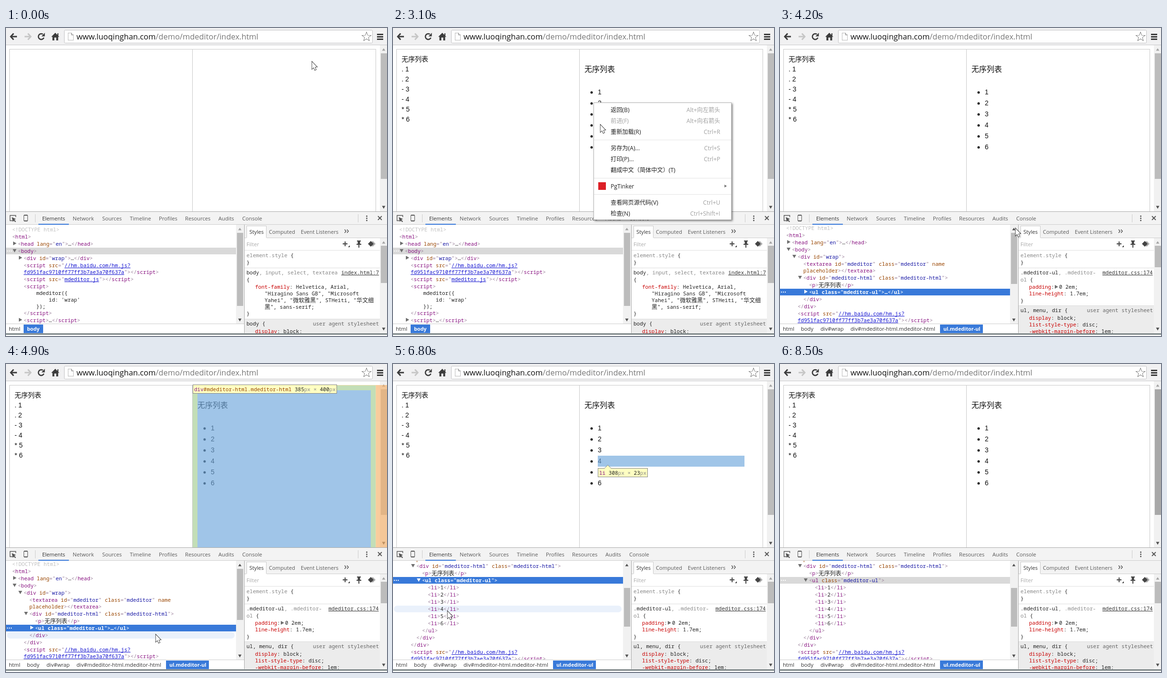
Write an HTML page with a canvas that moves like this. It is 800 px wide and 645 px high and loops after 8600 ms.

```html
<!DOCTYPE html>
<html lang="zh">
<head>
<meta charset="utf-8">
<style>
html, body { margin: 0; width: 100%; height: 100%; overflow: hidden; background: #fff; }
canvas { display: block; }
</style>
</head>
<body>
<canvas id="stage" width="800" height="645"></canvas>
<script>
const c = document.getElementById('stage').getContext('2d');
const LOOP = 8600, STEP = 100;
const MONO = '11px "Noto Sans Mono", monospace';
const CJK = '"Noto Sans CJK SC", "Noto Sans CJK", sans-serif';
const UI = '11.2px "Open Sans", sans-serif';
const MENU = '12.2px "Open Sans", ' + CJK;
const PAGE = 'px "Liberation Sans", ' + CJK;
const BLUE = '#3879d9';
const INK = { p: '#9a809a', t: '#881280', a: '#994500', v: '#1a1aa6', l: '#1414d0', k: '#222',
  z: '#222', d: '#c0c0c0', s: '#888', r: '#c80000', u: '#333' };

// ---------- basic drawing ----------
function rect(x, y, w, h, color) { c.fillStyle = color; c.fillRect(x, y, w, h); }
function frame(x, y, w, h, color) {
  c.strokeStyle = color; c.lineWidth = 1; c.strokeRect(x + .5, y + .5, w - 1, h - 1);
}
function pill(x, y, w, h, r, fill, line) {
  c.beginPath(); c.roundRect(x, y, w, h, r);
  if (fill) { c.fillStyle = fill; c.fill(); }
  if (line) { c.strokeStyle = line; c.lineWidth = 1; c.stroke(); }
}
function poly(pts, fill, line, width = 1, open) {
  c.beginPath();
  for (let i = 0; i < pts.length; i += 2) c.lineTo(pts[i], pts[i + 1]);
  if (!open) c.closePath();
  if (line) { c.strokeStyle = line; c.lineWidth = width; c.stroke(); }
  if (fill) { c.fillStyle = fill; c.fill(); }
}
function dot(x, y, r, color) { c.beginPath(); c.arc(x, y, r, 0, 7); c.fillStyle = color; c.fill(); }
function text(s, x, y, color, font, align = 'left') {
  c.font = font; c.fillStyle = color; c.textAlign = align; c.fillText(s, x, y);
  return c.measureText(s).width;
}
function clip(x, y, w, h, draw) {
  c.save(); c.beginPath(); c.rect(x, y, w, h); c.clip(); draw(); c.restore();
}
// Coloured code: each "|" is followed by an ink key.
function code(s, x, y, picked) {
  for (const part of s.split('|').slice(1)) {
    const key = part[0], str = part.slice(1);
    const color = !picked ? INK[key] : key === 'p' ? '#d3e2f8' : '#fff';
    const wide = key === 'z';
    const font = wide ? '12px ' + CJK : picked ? 'bold ' + MONO : MONO;
    const w = text(str, x, y + (wide ? 5 : 4), color, font);
    if (key === 'l' || key === 'u') rect(x, y + 5, w, 1, color);
    x += w;
  }
}
function tri(x, y, dir, color, r = 4) {
  if (dir === 'right') poly([x - r + 1, y - r, x + r, y, x - r + 1, y + r], color);
  if (dir === 'down') poly([x - r, y - r + 1, x + r, y - r + 1, x, y + r], color);
  if (dir === 'up') poly([x - r, y + r - 1, x + r, y + r - 1, x, y - r + 1], color);
}
function scrollbar(x, top, bottom, from, to, color, topInk = '#a3a3a3') {
  rect(x, top, 15, bottom - top, '#f1f1f1');
  rect(x + 2, from, 13, to - from, color);
  tri(x + 8, top + 9, 'up', topInk, 3.5);
  tri(x + 8, bottom - 9, 'down', '#505050', 3.5);
}

// ---------- browser bar ----------
function browserBar() {
  rect(0, 0, 800, 36, '#f1f1f2');
  rect(0, 35, 800, 1, '#c6c6c8');
  pill(122.5, 4.5, 647, 27, 2, '#fff', '#c2c2c4');
  const arrow = (x, d, color) => {
    poly([x + 7 * d, 18, x - 5 * d, 18], null, color, 3, true);
    poly([x, 11.5, x - 6 * d, 18, x, 24.5], null, color, 3, true);
  };
  arrow(16, 1, '#3c3c3c');
  arrow(46, -1, '#c6c6c6');
  c.beginPath(); c.arc(74, 18, 6, .4, 5.3);
  c.strokeStyle = '#3c3c3c'; c.lineWidth = 2.6; c.stroke();
  poly([81.5, 10, 81.5, 17.5, 74.5, 17.5], '#3c3c3c');
  poly([95, 18.5, 103.5, 10, 112, 18.5, 109.5, 18.5, 109.5, 26, 105.5, 26, 105.5, 20,
    101.5, 20, 101.5, 26, 97.5, 26, 97.5, 18.5], '#3c3c3c');
  rect(108, 11, 2, 5, '#3c3c3c');
  poly([130.5, 10.5, 137.5, 10.5, 141.5, 14.5, 141.5, 25.5, 130.5, 25.5], '#fff', '#777');
  poly([137.5, 10.5, 137.5, 14.5, 141.5, 14.5], null, '#777', 1, true);
  const font = '16.45px "Open Sans", sans-serif';
  const w = text('www.luoqinghan.com', 148, 24, '#111', font);
  text('/demo/mdeditor/index.html', 148 + w, 24, '#777', font);
  const star = [];
  for (let i = 0; i < 10; i++) {
    const a = i * Math.PI / 5 - Math.PI / 2, r = i % 2 ? 3.8 : 9;
    star.push(757 + r * Math.cos(a), 18.5 + r * Math.sin(a));
  }
  poly(star, '#fff', '#666', 1.6);
  for (const y of [12, 17, 22]) rect(779, y, 13, 3, '#3c3c3c');
}

// ---------- web page ----------
function page(t) {
  rect(0, 36, 800, 348, '#fff');
  frame(7, 44, 770, 400, '#c9c9c9');
  rect(391, 44, 1, 340, '#c9c9c9');
  const focus = t >= 400 && t < 2800;
  if (focus) {
    c.save();
    c.shadowColor = 'rgba(82,168,236,.8)'; c.shadowBlur = 8;
    rect(7, 44, 385, 400, '#66afe9');
    c.restore();
    rect(8, 45, 383, 398, '#fff');
    if (t < 1300) rect(18, 58, 1, 15, '#000');
    else if (t < 1700) rect(18, 204, 1, 15, '#000');
  }
  if (t >= 1300) {
    text('无序列表', 18, 70, '#111', 14 + PAGE);
    text('无序列表', 402, 92, '#111', 16 + PAGE);
    for (let i = 0; i < 6; i++) {
      text('..--**'[i] + ' ' + (i + 1), 18, 91 + 21 * i, '#111', 14 + PAGE);
      text(i + 1, 430, 139 + 23 * i, '#111', 14 + PAGE);
      dot(417, 135 + 23 * i, 2.5, '#111');
    }
  }
  scrollbar(785, 36, 384, 53, 316, t >= 7800 ? '#a8a8a8' : '#bcbcbc');
}

const FILL = 'rgba(111,168,220,.66)', PAD = 'rgba(147,196,125,.55)';
const MARGIN = 'rgba(246,178,107,.66)', BORDER = 'rgba(255,229,153,.66)';
function tip(x, y, name, w, h, notch) {
  const s = name + `|k ${w}|spx × |k${h}|spx`;
  c.font = MONO;
  const width = Math.ceil(c.measureText(s.replace(/\|./g, '')).width) + 6;
  rect(x, y, width, 19, '#ffffc2');
  frame(x, y, width, 19, '#858585');
  if (notch) {
    poly([x + 14, y + 1, x + 21, y - 6, x + 28, y + 1], '#ffffc2');
    poly([x + 14, y + .5, x + 21, y - 6.5, x + 28, y + .5], null, '#858585', 1, true);
  }
  code(s, x + 3, y + 10);
}
function overlay(node) {
  if (node === 'box') {
    rect(402, 55, 364, 329, FILL);
    rect(392, 45, 384, 10, PAD);
    rect(392, 55, 10, 329, PAD);
    rect(766, 55, 10, 329, PAD);
    rect(392, 44, 385, 1, BORDER);
    rect(776, 45, 1, 339, BORDER);
    rect(777, 44, 23, 340, MARGIN);
    tip(392, 43, '|tdiv|a#mdeditor-html.mdeditor-html', 385, 400);
  } else if (node === 'p') {
    rect(402, 75, 364, 24, FILL);
    tip(402, 102, '|tp', 364, 24, true);
  } else if (node === 'ul') {
    rect(430, 123, 308, 138, FILL);
    rect(402, 123, 28, 138, PAD);
    rect(738, 123, 28, 138, PAD);
    rect(402, 109, 364, 14, MARGIN);
    rect(402, 261, 364, 14, MARGIN);
    tip(402, 278, '|tul|a.mdeditor-ul', 364, 138, true);
  } else if (node > 0) {
    const y = 100 + 23 * node;
    rect(430, y, 308, 23, FILL);
    tip(430, y + 26, '|tli', 308, 23, true);
  }
}

// ---------- element tree ----------
const start = (name, ...attrs) => `|p<|t${name}` + attrs.map(([k, v]) => `|p |a${k}|p="|v${v}|p"`).join('');
const open = (...a) => start(...a) + '|p>';
const close = name => `|p</|t${name}|p>`;
const R = 'right', D = 'down';
const hashRows = [
  [37, '', '|p<|tscript |asrc|p="|l//hm.baidu.com/hm.js?', 14],
  [37, '', '|lfd951fac9710ff77ff3b7ae3a70f637a|p">' + close('script'), 15]
];
const headRows = [
  [13, '', '|d<!DOCTYPE html>', 15],
  [13, '', open('html'), 15],
  [25, R, open('head', ['lang', 'en']) + '|k…' + close('head'), 15],
  [25, D, open('body'), 15, 'body']
];
const shortTree = [
  ...headRows,
  [37, R, open('div', ['id', 'wrap']) + '|k…' + close('div'), 15],
  ...hashRows,
  [37, '', '|p<|tscript |asrc|p="|lmdeditor.js|p">' + close('script'), 15],
  [37, '', open('script'), 14],
  [37, '', '|k    mdeditor({', 14],
  [37, '', "|k        id: 'wrap'", 14],
  [37, '', '|k    });', 14],
  [37, '', close('script'), 15],
  [37, R, open('script') + '|k…' + close('script'), 15]
];
function fullTree(opened) {
  const ul = open('ul', ['class', 'mdeditor-ul']);
  const list = [1, 2, 3, 4, 5, 6].map(n => [73, '', open('li') + '|k' + n + close('li'), 15, n]);
  return [
    ...headRows,
    [37, D, open('div', ['id', 'wrap']), 15],
    [49, '', start('textarea', ['id', 'mdeditor'], ['class', 'mdeditor']) + '|a name', 14],
    [49, '', '|aplaceholder|p>' + close('textarea'), 15],
    [49, D, open('div', ['id', 'mdeditor-html'], ['class', 'mdeditor-html']), 15, 'box'],
    [61, '', open('p') + '|z无序列表' + close('p'), 15, 'p'],
    ...(opened ? [[61, D, ul, 15, 'ul'], ...list, [61, '', close('ul'), 15, 'ul']]
      : [[61, R, ul + '|k…' + close('ul'), 15, 'ul']]),
    [49, '', close('div'), 15, 'box'],
    [37, '', close('div'), 15],
    ...hashRows
  ];
}
const closedTree = fullTree(false), openTree = fullTree(true);

// Draws the tree and returns the node under the pointer.
function tree(t, px, py) {
  const rows = t < 4000 ? shortTree : t < 5600 ? closedTree : openTree;
  const pick = t < 4000 ? 'body' : 'ul', blue = t >= 4000 && t < 8500;
  const inside = px >= 0 && px < 483 && py > 412 && py < 619;
  let y = t < 4000 ? 422 : t < 5600 ? 419 : 319, hit, picked;
  rect(0, 412, 484, 208, '#fff');
  clip(0, 412, 484, 208, () => {
    for (const [x, arrow, s, step, node] of rows) {
      const chosen = node === pick && !picked;
      const over = inside && py >= y - 7.5 && py < y + 7.5;
      if (over) hit = node;
      if (chosen) {
        picked = true;
        rect(0, y - 7, 483, 14, blue ? BLUE : '#d9d9d9');
        for (const dx of [2, 6, 10]) rect(dx, y - 1, 2, 2, '#fff');
      } else if (over) pill(2, y - 7, 478, 14, 7, '#eaf1fb');
      if (arrow) tri(x - 7, y - 1, arrow, chosen && blue ? '#fff' : '#6e6e6e');
      code(s, x, y, chosen && blue);
      y += step;
    }
  });
  const [from, to] = t < 4000 ? [429, 582] : t < 5600 ? [429, 536] : [469, 550];
  scrollbar(483, 412, 620, from, to, '#bcbcbc', t < 4000 ? '#a3a3a3' : '#505050');
  return hit;
}

// ---------- developer panel ----------
function panelBar() {
  rect(0, 384, 800, 261, '#f3f3f3');
  rect(0, 384, 800, 1, '#a9a9a9');
  rect(0, 411, 800, 1, '#cdcdcd');
  const ink = '#555';
  poly([17, 403.5, 8.5, 403.5, 8.5, 392.5, 20.5, 392.5, 20.5, 396], null, ink, 1.4, true);
  poly([12, 396, 21, 400, 17.5, 401.5, 21, 405, 19.5, 406.5, 16, 403, 14.5, 406], ink);
  pill(37.5, 391.5, 8, 13, 1.5, null, ink);
  rect(38, 391, 7, 2, ink); rect(38, 403, 7, 2, ink);
  rect(61, 390, 1, 17, '#ccc');
  rect(739, 390, 1, 17, '#ccc');
  const tabs = { Elements: 76, Network: 140, Sources: 202, Timeline: 260, Profiles: 321,
    Resources: 376, Audits: 446, Console: 496 };
  for (const name in tabs) text(name, tabs[name], 403, name === 'Elements' ? '#333' : '#5a5a5a', UI);
  rect(68, 410, 64, 2, BLUE);
  for (const y of [394, 398.5, 403]) dot(757.5, y, 1.5, ink);
  poly([781, 394, 789, 402], null, ink, 1.8, true);
  poly([789, 394, 781, 402], null, ink, 1.8, true);
}

function crumbs(t) {
  rect(0, 619, 500, 21, '#fff');
  rect(0, 619, 500, 1, '#cdcdcd');
  const items = t < 4000 ? [['html', 6], ['body', 44, 37, 41]]
    : [['html', 6], ['body', 44], ['div#wrap', 85], ['div#mdeditor-html.mdeditor-html', 148],
      ['ul.mdeditor-ul', 343, 336, 90]];
  for (const [s, x, left, w] of items) {
    if (w) rect(left, 621, w, 18, BLUE);
    text(s, x, 634, w ? '#fff' : '#333', w ? 'bold 10.8px "Open Sans", sans-serif' : UI);
  }
}

const bodyRules = [
  [505, 512, '|kbody|s, input, select, textarea'], [704, 512, '|uindex.html:7'], [505, 527, '|k{'],
  [523, 542, '|rfont-family|k: Helvetica, Arial,'],
  [543, 556, '|k"Hiragino Sans GB", "Microsoft'],
  [543, 570, '|kYahei", "|z微软雅黑|k", STHeiti, "|z华文细'],
  [543, 584, '|z黑|k", sans-serif;'], [505, 598, '|k}'],
  [505, 619, '|kbody {'], [523, 635, '|rdisplay|k: block;']
];
const listRules = [
  [505, 512, '|k.mdeditor-ul|s, .mdeditor-'], [677, 512, '|umdeditor.css:174'], [505, 527, '|sol |k{'],
  [523, 542, '|rpadding|k:'], [586, 542, '|k0 2em;'], [523, 556, '|rline-height|k: 1.7em;'],
  [505, 571, '|k}'], [505, 591, '|kul, menu, dir {'], [523, 607, '|rdisplay|k: block;'],
  [523, 621, '|rlist-style-type|k: disc;'], [523, 635, '|r-webkit-margin-before|k: 1em;']
];
function sidebar(t) {
  const first = t < 4000, agent = first ? 609 : 581;
  rect(500, 412, 1, 228, '#a9a9a9');
  rect(501, 439, 299, 1, '#cdcdcd');
  rect(505, 414, 42, 26, '#fff');
  poly([505.5, 439, 505.5, 414.5, 546.5, 414.5, 546.5, 439], null, '#c9c9c9', 1, true);
  text('Styles', 511, 431, '#333', UI);
  text('Computed', 552, 431, '#5a5a5a', UI);
  text('Event Listeners', 619, 431, '#5a5a5a', UI);
  for (const x of [711, 716]) poly([x, 422, x + 3, 425.5, x, 429], null, '#555', 1.5, true);
  rect(501, 440, 285, 200, '#fff');
  rect(501, 465, 285, 1, '#e0e0e0');
  text('Filter', 505, 457, '#aaa', UI);
  rect(707, 451, 10, 2, '#444'); rect(711, 447, 2, 10, '#444');
  poly([722, 455, 722, 459, 718, 459], '#444');
  rect(737, 445, 8, 2, '#444'); rect(738.5, 446, 5, 6, '#444');
  rect(736, 452, 10, 2, '#444'); rect(740, 454, 2, 6, '#444');
  poly([770, 446, 776, 452, 770, 458, 764, 452], '#aaa');
  poly([766, 446, 772, 452, 766, 458, 760, 452], '#444');
  clip(501, 466, 284, 173, () => {
    rect(501, 502, 285, 1, '#dcdcdc');
    rect(501, agent, 285, 60, '#ececec');
    rect(501, agent, 285, 1, '#dcdcdc');
    code('|selement.style |k{', 505, 476);
    code('|k}', 505, 491);
    for (const [x, y, s] of first ? bodyRules : listRules) code(s, x, y);
    if (!first) tri(580, 542, R, '#6e6e6e');
    text('user agent stylesheet', 783, agent + 14, '#666', MONO, 'right');
  });
  scrollbar(785, 440, 639, 456, first ? 534 : 501, '#bcbcbc');
}

// ---------- context menu ----------
const menuItems = [
  [171, '返回(B)', 'Alt+向左箭头'], [194, '前进(F)', 'Alt+向右箭头', true], [217, '重新加载(R)', 'Ctrl+R'],
  [251, '另存为(A)...', 'Ctrl+S'], [274, '打印(P)...', 'Ctrl+P'], [297, '翻成中文（简体中文）(T)', ''],
  [331, 'PgTinker', ''], [365, '查看网页源代码(V)', 'Ctrl+U'], [388, '检查(N)', 'Ctrl+Shift+I']
];
function menu(py) {
  c.save();
  c.shadowColor = 'rgba(0,0,0,.5)'; c.shadowBlur = 4; c.shadowOffsetX = c.shadowOffsetY = 2;
  rect(421, 156, 290, 246, '#fff');
  c.restore();
  frame(421, 156, 290, 246, '#b5b5b5');
  for (const y of [234, 314, 348]) rect(422, y, 288, 1, '#e4e4e4');
  for (const [y, label, keys, off] of menuItems) {
    const over = !off && py >= y - 12 && py < y + 12;
    if (over) rect(422, y - 12, 289, 23, '#4281f4');
    text(label, 457, y + 5, over ? '#fff' : off ? '#a0a0a0' : '#222', MENU);
    text(keys, 687, y + 5, over ? '#fff' : '#a0a0a0', MENU, 'right');
  }
  rect(431, 323, 16, 16, '#dc1f26');
  tri(698, 331, R, '#777', 3);
}

// ---------- pointer ----------
const track = [[0, 642, 70], [200, 221, 149], [300, 221, 149], [1000, 252, 275], [1600, 252, 275],
  [1900, 160, 215], [2100, 160, 215], [2700, 421, 156], [2900, 421, 156], [3900, 493, 388],
  [4400, 495, 440], [4500, 495, 440], [4900, 314, 566], [5200, 57, 553], [5600, 57, 553],
  [5800, 274, 545], [5900, 274, 545], [6500, 114, 468], [6800, 114, 517], [7000, 118, 530],
  [7200, 300, 470], [7400, 545, 215], [7700, 774, 126], [8100, 802, 130], [8600, 802, 130]];
function pointerAt(t) {
  const i = track.findIndex(k => k[0] > t), a = track[i - 1], b = track[i];
  const f = (t - a[0]) / (b[0] - a[0]);
  return [a[1] + (b[1] - a[1]) * f, a[2] + (b[2] - a[2]) * f].map(Math.round);
}
function pointer(t, x, y) {
  c.save();
  c.translate(x, y);
  if (t === 3900) {
    const ends = [0, -10, 4, -5, 1, -5, 1, 5, 4, 5, 0, 10, -4, 5, -1, 5, -1, -5, -4, -5];
    poly(ends, '#000', '#fff', 2.4);
  } else if (x > 8 && x < 391 && y > 45 && y < 384 && t < 2800) {
    rect(0, -7, 1, 15, '#000');
    for (const dx of [-3, 1]) { rect(dx, -8, 3, 1, '#000'); rect(dx, 8, 3, 1, '#000'); }
  } else {
    poly([.5, .5, .5, 16, 4, 12.8, 6.5, 18.3, 9, 17.2, 6.6, 11.8, 11, 11.5], '#fff', '#000', 1.4);
  }
  c.restore();
}

function draw(t) {
  const [x, y] = pointerAt(t);
  c.textBaseline = 'alphabetic';
  clip(0, 36, 800, 348, () => page(t));
  browserBar();
  panelBar();
  const node = tree(t, x, y);
  crumbs(t);
  sidebar(t);
  rect(0, 639, 800, 1, '#c4c8c8');
  rect(0, 640, 800, 2, '#5d696b');
  rect(0, 642, 800, 3, '#fafafa');
  rect(0, 643, 92, 1, '#dfe9e6');
  clip(0, 36, 800, 348, () => overlay(node));
  if (t >= 2800 && t < 4000) menu(y);
  pointer(t, x, y);
}
function tick() {
  const t = performance.now() % LOOP;
  draw(Math.floor(t / STEP) * STEP);
  requestAnimationFrame(tick);
}
tick();
</script>
</body>
</html>
```
